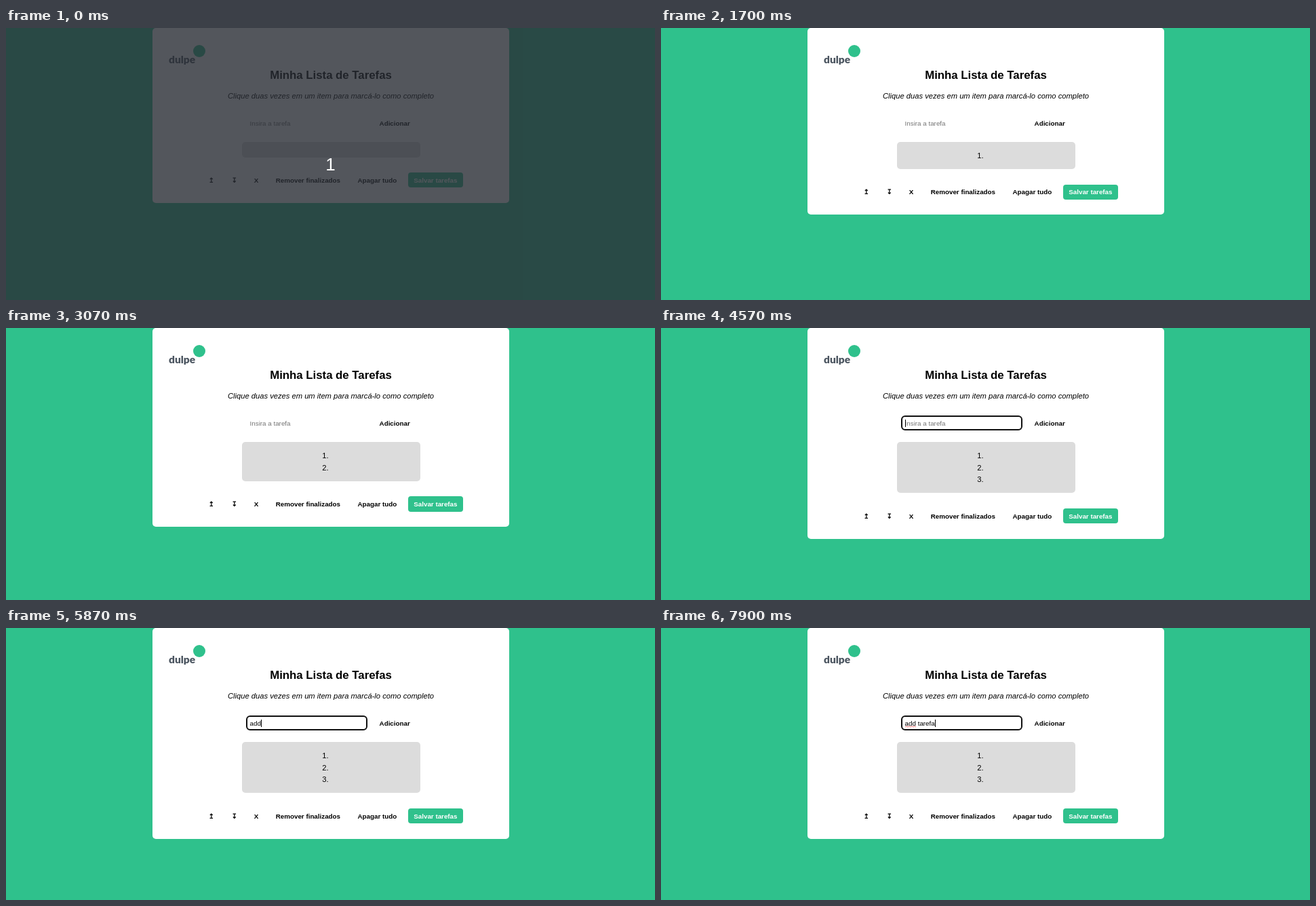
Animation, 957 px wide and 401 px high, one loop 8000 ms. Source, as an HTML page:

```html
<!DOCTYPE html>
<html lang="pt-BR">
<head>
<meta charset="utf-8">
<title>Lista de Tarefas</title>
<style>
  html, body { margin: 0; width: 100%; height: 100%; overflow: hidden; background: #2fc18c; }
  svg { display: block; }
  text { font-family: "Liberation Sans", Arial, sans-serif; white-space: pre; }
  .mid { text-anchor: middle; }
  .small { font-size: 9.8px; }
  .bold { font-weight: bold; }
  .item { font-size: 11.2px; }
  .brand { font: 900 15.5px Lato, sans-serif; fill: #4b5560; }
</style>
</head>
<body>
<svg width="957" height="401" viewBox="0 0 957 401">
  <rect id="card" x="216" width="526" rx="5" fill="#fff"/>
  <text class="brand" x="240" y="52">dulpe</text>
  <circle cx="285" cy="34" r="9" fill="#2fc18c"/>
  <text class="mid bold" x="479" y="75" font-size="16.8">Minha Lista de Tarefas</text>
  <text class="mid" x="479" y="104" font-size="11.2" font-style="italic">Clique duas vezes em um item para marcá-lo como completo</text>

  <rect id="focus" x="355" y="130" width="177" height="20" rx="5" fill="none" stroke="#101010" stroke-width="2"/>
  <text id="hint" class="small" x="359.6" y="144" fill="#757575">Insira a tarefa</text>
  <text id="typed" class="small" x="359.6" y="144"></text>
  <path id="squiggle" fill="none" stroke="#f00" stroke-width=".8" opacity=".65"/>
  <rect id="caret" y="135" width="1" height="11"/>
  <text class="mid small bold" x="573.2" y="144">Adicionar</text>

  <rect id="list" x="348" y="168" width="263" rx="5" fill="#dcdcdc"/>
  <text class="item" x="466.3" y="192">1.</text>
  <text class="item" x="466.3" y="210">2.</text>
  <text class="item" x="466.3" y="227">3.</text>

  <rect id="save" x="593" width="81" rx="4" fill="#2fc18c"/>
  <g id="labels" class="mid small bold">
    <text x="302.5">↥</text>
    <text x="336.5">↧</text>
    <text x="369">X</text>
    <text x="445.4">Remover finalizados</text>
    <text x="547.3">Apagar tudo</text>
    <text x="633.4" fill="#fff">Salvar tarefas</text>
  </g>

  <g id="countdown">
    <rect width="957" height="401" fill="#282c34" fill-opacity=".8"/>
    <text class="mid" x="478.5" y="210" font-size="26" fill="#fff">1</text>
  </g>
</svg>
<script>
const LOOP = 8000, ROW = 17.6;
const ADDED = [1700, 3070, 3870];
const FOCUS = 4570, BLINK = 5170, SPELL = 6470;
const PHRASE = 'add tarefa';
const KEYS = [5470, 5730, 5870, 6300, 6730, 6830, 7100, 7470, 7730, 7900];

const el = id => document.getElementById(id);
const show = (node, on) => node.setAttribute('visibility', on ? 'visible' : 'hidden');
const passed = (times, t) => times.filter(s => t >= s).length;
const items = document.querySelectorAll('.item');

function span(id, top, bottom) {
  const y = Math.round(top);
  el(id).setAttribute('y', y);
  el(id).setAttribute('height', Math.round(bottom) - y);
}

let wave = 'M360 146';
for (let i = 1; i <= 8; i++) wave += `L${360 + 2 * i} ${i % 2 ? 144.8 : 146}`;
el('squiggle').setAttribute('d', wave);

function draw(t) {
  const count = passed(ADDED, t), shift = count * ROW;
  span('card', 0, 257.7 + shift);
  span('list', 168, 190.5 + shift);
  span('save', 213.1 + shift, 235.45 + shift);
  for (const label of el('labels').children) label.setAttribute('y', Math.round(227.7 + shift));
  items.forEach((item, i) => show(item, i < count));

  const length = passed(KEYS, t);
  el('typed').textContent = PHRASE.slice(0, length);
  const width = length ? el('typed').getComputedTextLength() : 0;
  el('caret').setAttribute('x', Math.round(359.8 + width));
  show(el('caret'), t >= FOCUS && (t < BLINK || length));
  show(el('focus'), t >= FOCUS);
  show(el('hint'), !length);
  show(el('squiggle'), t >= SPELL);
  show(el('countdown'), t < 30);
}

const start = performance.now();
function tick() {
  draw((performance.now() - start) % LOOP);
  requestAnimationFrame(tick);
}
draw(0);
requestAnimationFrame(tick);
</script>
</body>
</html>
```
